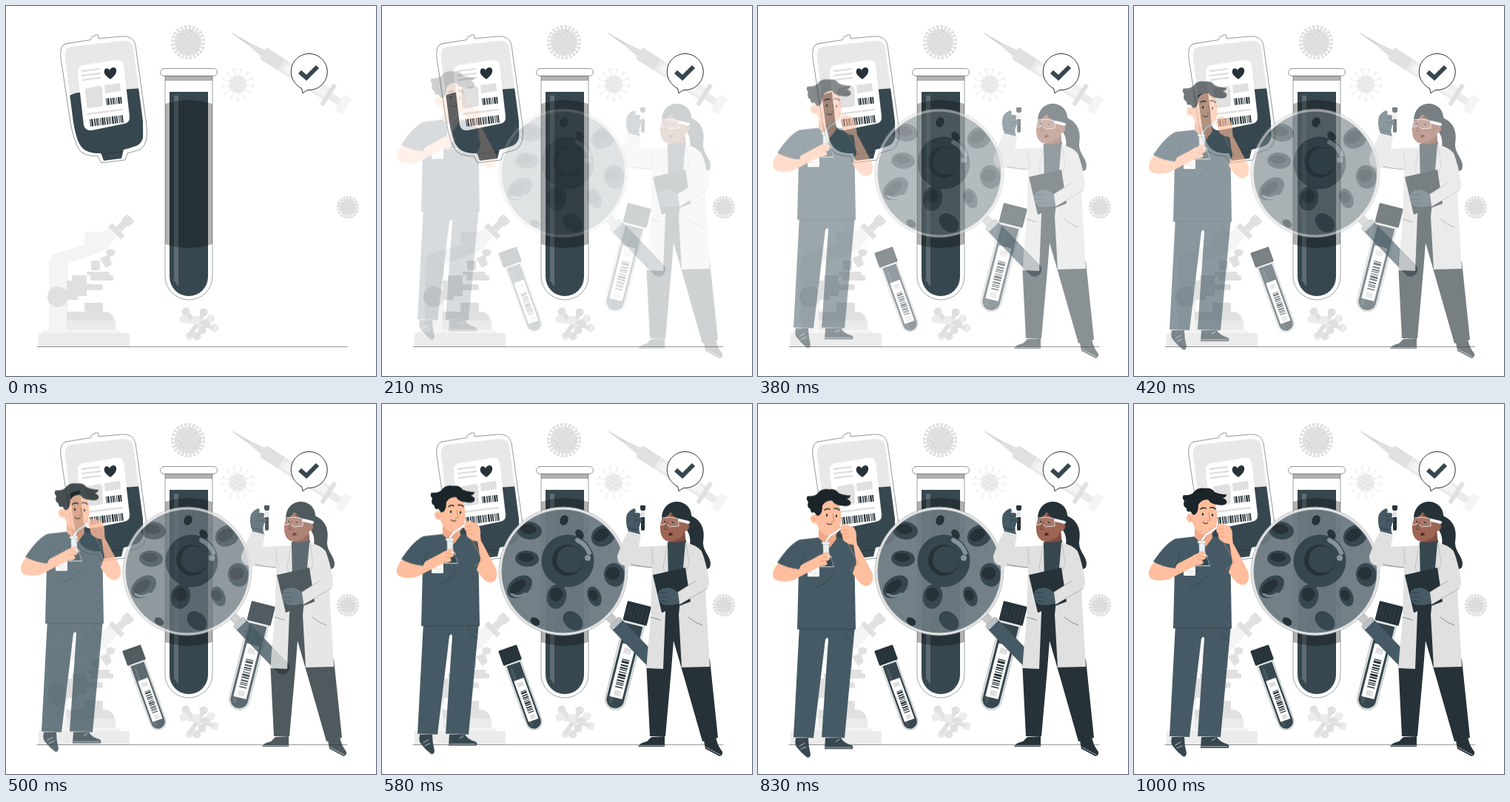
Recreate the animation shown at these times as an HTML page with a canvas. Size 500 px wide and 500 px high, loop 1040 ms.

```html
<!DOCTYPE html>
<html lang="en">
<head>
<meta charset="utf-8">
<title>Blood test</title>
<style>
html, body { margin: 0; width: 100%; height: 100%; overflow: hidden; background: #fff; }
canvas { display: block; width: 100vw; height: 100vh; }
</style>
</head>
<body>
<canvas id="stage"></canvas>
<script>
const SIZE = 500, LOOP = 1040;
const INK = '#263238', SLATE = '#37474f', STEEL = '#455a64';
const G1 = '#e0e0e0', G2 = '#ebebeb', G3 = '#f4f4f4';
const SKIN = '#ffbe9d', BROWN = '#9c6554', HAIR = '#1b2429';
const ratio = window.devicePixelRatio || 1;
let c;

function makeLayer(paint, canvas = document.createElement('canvas')) {
  canvas.width = canvas.height = SIZE * ratio;
  c = canvas.getContext('2d');
  c.scale(ratio, ratio);
  c.lineJoin = c.lineCap = 'round';
  paint();
  return canvas;
}

function shape(d, fill, stroke, width = 1) {
  const p = typeof d === 'string' ? new Path2D(d) : d;
  if (fill) { c.fillStyle = fill; c.fill(p); }
  if (stroke) { c.strokeStyle = stroke; c.lineWidth = width; c.stroke(p); }
}
const line = (d, color = INK, width = 1) => shape(d, null, color, width);

function oval(x, y, rx, ry, fill, turn = 0, stroke, width) {
  const p = new Path2D();
  p.ellipse(x, y, rx, ry, turn * Math.PI / 180, 0, 7);
  shape(p, fill, stroke, width);
}
const dot = (x, y, r, fill, stroke, width) => oval(x, y, r, r, fill, 0, stroke, width);

function box(x, y, w, h, fill, r = 0, stroke, width) {
  const p = new Path2D();
  p.roundRect(x, y, w, h, r);
  shape(p, fill, stroke, width);
}

function placed(x, y, deg, scale, paint) {
  c.save();
  c.translate(x, y);
  c.rotate(deg * Math.PI / 180);
  c.scale(scale, scale);
  paint();
  c.restore();
}

function clipped(d, paint) {
  c.save();
  c.clip(typeof d === 'string' ? new Path2D(d) : d);
  paint();
  c.restore();
}

function barcode(x, y, deg, length, height) {
  placed(x, y, deg, 1, () => {
    for (let i = 0, at = 0; at < length - 1; i++) {
      const w = 1 + (i * 7 % 5 % 3) * .7;
      box(at, 0, Math.min(w, length - at), height, INK);
      at += w + .8 + (i * 5 % 3) * .4;
    }
  });
}

function virus(x, y, r, spikes, reach, color, mark, thin) {
  for (let i = 0; i < spikes; i++) {
    placed(x, y, i * 360 / spikes + 6, 1, () => {
      line(`M${r - 1} 0H${reach - 1}`, color, thin ? 1 : 2.6);
      line(`M${reach - 1} ${thin ? -2 : -1.3}V${thin ? 2 : 1.3}`, color, thin ? 1.3 : 2);
    });
  }
  dot(x, y, r, color);
  for (let i = 0; i < spikes; i++) {
    const a = i * 2.4, d = r * .85 * Math.sqrt(i / spikes);
    dot(x + d * Math.cos(a), y + d * Math.sin(a), 1.1, mark);
  }
}

function syringe() {
  placed(306, 37, 32.7, 1, () => {
    shape('M0-.5L30-2V2L0 .5Z', '#d6d6d6');
    shape('M27-2L49-5V5L27 2Z', G1);
    box(49, -9, 32, 18, G1, 3);
    box(78, -9, 76, 18, G2, 2);
    box(83, -5, 68, 10, G3);
    for (let x = 62; x < 140; x += 7) line(`M${x}-9V-4`, '#d8d8d8', .7);
    box(153, -5, 24, 10, G2);
    box(151, -17, 6, 34, G1, 3);
    box(172, -12, 12, 24, G3, 2);
  });
}

function microscope() {
  shape('M58 440V348Q58 337 68 334L106 323V309Q106 305 111 305H132L146 316L136 328Q133 331 127 333L84 348V440Z', G3);
  shape('M131 307L143 295L155 307L142 320Z', G3);
  placed(152, 302, -44, 1, () => {
    box(-7, -12, 7, 24, G1, 1);
    box(0, -5, 13, 10, G1);
    box(12, -7, 11, 14, G1, 2);
  });
  box(115, 344, 12, 13, G1, 1);
  shape('M127 341L139 336L143 349L135 354Z', G1);
  shape('M135 331Q141 326 148 331L145 338Q140 339 136 336Z', G1);
  box(109, 359, 31, 5, G1, 2);
  box(114, 364, 31, 7, G1, 2);
  box(89, 364, 20, 28, G1);
  box(82, 371, 15, 26, G1);
  box(95, 376, 36, 8, G1, 3);
  dot(70, 393, 14, G1);
  box(106, 401, 25, 12, G1, 1);
  for (let x = 110; x < 130; x += 5) line(`M${x} 402V411`, '#d5d5d5', .6);
  shape('M82 413H135Q146 416 147 426H82Z', G1);
  box(82, 425, 66, 14, G2);
  box(48, 438, 107, 5, G3);
  box(44, 442, 123, 19, G2);
}

function bag() {
  shape('M81 51L112 46Q116 46 115 43Q115 41 119 41Q121 37 125 40V44L157 41Q172 40 175 53L190 162Q193 187 181 194L164 199L161 208L129 212L124 203Q104 203 98 193Q91 180 87 157L74 70Q72 53 81 51Z',
    '#fff', INK, .5);
  const inner = 'M88 55L158 47Q170 46 172 57L186 163Q188 184 176 189Q158 196 130 199Q108 200 101 189Q95 181 91 157L80 72Q78 57 88 55Z';
  shape(inner, '#e8e8e8');
  clipped(inner, () => shape('M80 126Q88 118 98 117L185 111V205H85Z', SLATE));
  shape('M128 198L159 194L156 206L132 209Z', SLATE);
  line('M130 200L157 197', INK, .8);
  shape('M104 80L149 73Q158 72 159 80L167 149Q168 157 160 159L116 168Q107 169 105 161L97 91Q96 82 104 80Z', '#fff');
  shape('M141 99C134 94 132 91 133 87C134 83 139 84 140 87C142 82 148 82 149 86C150 91 146 95 141 99Z', INK);
  line('M103 88L126 85M103 94L127 91M104 100L127 97', G1, 2.7);
  shape('M133 107L154 104L155 115L134 118Z', G1);
  shape('M110 111L126 108Q129 108 130 111L131 132Q131 135 128 136L112 138Q109 138 109 135L107 115Q107 111 110 111Z', G1);
  line('M110 146L157 140', G1, 2.7);
  barcode(135, 125, -6, 22, 9);
  barcode(113, 153, -7, 45, 10);
}

function bigTube() {
  const body = 'M215 95V365A32 32 0 0 0 279 365V95Z';
  shape(body, '#fff', INK, .45);
  shape('M221 116H273V366A26 26 0 0 1 221 366Z', SLATE);
  shape('M227 121H233V379L227 371Z', 'rgba(255,255,255,.2)');
  clipped(body, () => {
    dot(247, 227, 100, 'rgba(0,0,0,.3)');
    box(215, 95, 64, 6, 'rgba(0,0,0,.3)');
  });
  box(208.5, 84.5, 77, 10, '#fff', 5, INK, .5);
}

function backdrop() {
  box(0, 0, SIZE, SIZE, '#fff');
  virus(246, 49, 18, 24, 23, G1, '#d4d4d4');
  virus(313, 106, 12, 13, 22, '#ececec', '#dcdcdc', true);
  virus(462, 272, 11, 18, 15, G1, '#d5d5d5');
  syringe();
  microscope();
  [[243, 413], [240, 423], [249, 424], [267, 414], [277, 422], [258, 430], [265, 438], [282, 435], [248, 446], [258, 446]]
    .forEach(([x, y], i) => dot(x, y, 5.5, i % 3 ? G2 : G1));
  line('M243 413L258 430L267 415M258 430L248 445M258 425L278 434', G1, 6);
  dot(257, 425, 6, G2);
  dot(270, 429, 6, G1);
  line('M42 460.5H461', INK, .5);
  bag();
  bigTube();
  shape('M399 111A24.5 24.5 0 1 1 408 113.4Q404 115 401 118Q401 114 399 111Z', '#fff', INK);
  c.lineCap = 'butt'; c.lineJoin = 'miter';
  line('M397 89L406 97L421 82', SLATE, 6);
  c.lineCap = c.lineJoin = 'round';
}

function cell(x, y, rx, ry, turn) {
  oval(x, y, rx, ry, SLATE, turn);
  placed(x, y, turn, 1, () => oval(-rx * .1, -ry * .15, rx * .68, ry * .55, INK));
}

function magnifier() {
  placed(306, 286, 46, 1, () => {
    box(0, -6, 15, 12, '#c7c7c7');
    box(11, -9.5, 96, 19, STEEL, [2, 9, 9, 2]);
    box(11, -9.5, 7, 19, '#b9c0c3', 2);
  });
  dot(245, 226, 84, 'rgba(109,122,129,.95)');
  const glass = new Path2D();
  glass.arc(245, 226, 83, 0, 7);
  clipped(glass, () => {
    cell(199, 171, 17, 12, 8);
    oval(246, 157, 5.5, 7, INK, 25);
    cell(299, 178, 17, 14, -30);
    cell(196, 209, 16, 11, 4);
    cell(186, 247, 19, 13, -38);
    cell(236, 260, 13, 17, 12);
    cell(287, 260, 9, 14, -22);
    cell(314, 231, 14, 16, -15);
    oval(258, 293, 15, 11, SLATE, 42);
    oval(207, 294, 7, 5, INK, 35);
    line('M175 257Q184 263 194 256', '#75878f', 3);
    dot(251, 212, 35.5, SLATE);
    dot(251, 211, 21, INK);
    dot(254, 210, 18, SLATE);
    line('M237 202A18 18 0 0 0 257 229', INK, 3);
    oval(267, 176, 5, 7, INK, -35);
    line('M264 184Q276 190 280 201', '#84939a', 6);
    dot(278, 208, 4, '#84939a');
  });
  dot(245, 226, 85, null, '#e2e2e2', 3.4);
  dot(245, 226, 87, null, '#8d979b', .5);
  dot(245, 226, 83, null, '#89959a', .5);
}

function vial(x, y, deg, scale) {
  placed(x, y, deg, scale, () => {
    shape('M-11 20H11V105A11 11 0 0 1-11 105Z', '#e4e7e8', '#9da5a8', .5);
    shape('M-9.4 23H9.4V105A9.4 9.4 0 0 1-9.4 105Z', SLATE);
    box(-6, 27, 3, 83, 'rgba(255,255,255,.1)');
    box(-7, 45, 14, 58, '#fff');
    box(-4, 49, 8, 6, G1);
    box(-3, 95, 7, 6, G1);
    barcode(4.5, 61, 90, 31, 8);
    box(-13, 0, 26, 21, INK, 1);
    for (let i = -10; i < 12; i += 4) line(`M${i} 4V18`, SLATE, .6);
  });
}

function woman() {
  // legs and shoes
  shape('M379 270H404L407 345H443L454 451L433 456L405 358L394 320L391 358L383 449H362L357 348Z', INK);
  shape('M364 450L382 449V463H346Q348 458 358 456Z', INK);
  shape('M435 455L451 450Q453 461 460 470Q461 475 456 476Q443 469 437 466Z', INK);
  line('M347 461.5H381M438 464L457 474', '#fff', .6);
  // ponytail and neck
  shape('M408 148C432 153 437 169 434 186C433 201 448 208 443 221C436 227 422 222 417 208C412 195 422 184 411 169Z', INK);
  shape('M389 174L409 168L411 191L387 191Z', '#7d4d40');
  // top and coat
  shape('M386 186Q398 189 411 184L412 245L405 274H380Z', SLATE);
  shape('M386 191L347 193L350 176L333 170Q324 188 318 205Q317 217 330 219L365 221L363 290L357 357L380 358L383 282L387 246Z', G1);
  shape('M410 187Q426 191 432 199Q438 214 442 238Q443 248 437 252L443 355L405 356L401 285L405 245Z', G1);
  line('M385 193L380 220L387 246M411 188L415 216L405 241M365 195L366 217', '#b1b1b1', .7);
  line('M414 288Q423 296 433 299M363 288L376 292M365 221Q350 220 337 217', INK, .5);
  // clipboard and lower hand
  shape('M366 231L410 221L417 267L378 282Z', INK);
  shape('M438 231Q445 244 438 250L402 271L397 256L424 239Z', G1);
  line('M424 239L397 256L402 271L438 250', '#9a9a9a', .7);
  shape('M400 255Q391 246 381 249Q374 250 373 257Q372 268 381 271Q393 273 402 269Z', STEEL);
  line('M374 256L386 255M374 261L387 261M376 266L387 267', INK, .7);
  // raised hand with sample
  box(350, 141, 5, 30, INK, 2);
  box(349, 137, 7, 6, INK, 1);
  box(350, 144, 5, 9, '#e6e6e6');
  shape('M333 172Q328 159 331 149Q335 143 341 141Q344 143 342 147L347 147Q351 149 348 152L351 155Q353 158 349 161L347 169L349 176Z', STEEL);
  line('M341 151L348 151M340 157L349 157M331 166Q340 171 348 169', INK, .7);
  // head
  shape('M379 154Q375 163 376 169Q376 180 384 185Q397 187 407 177L416 162L412 146L385 145Z', BROWN);
  shape('M378 156C378 139 388 132 399 132C414 133 420 145 418 158L414 171Q409 166 408 158Q396 155 390 146Q386 152 378 156Z', INK);
  oval(411, 166, 4, 5, BROWN, 10);
  shape('M376 154L389 153L401 155V165L389 166L384 162L376 164Z', 'rgba(255,255,255,.12)', '#eee', .8);
  line('M402 157L414 160', '#f0f0f0', 4);
  line('M381 150L386 149M391 150L398 152', INK, 1.3);
  dot(382, 159, 1.1, INK);
  dot(393, 160, 1.1, INK);
  line('M385 160L382 169L386 170', '#5b352b', .8);
  oval(390, 176, 3, 2, '#4f2b28', -8);
  dot(412, 174, 1.2, '#fff');
}

function man() {
  // trousers and shoes
  shape('M56 298H131L117 450L86 449L95 317Q94 312 91 317L75 450L48 449Z', STEEL);
  line('M117 306Q121 318 129 320', INK, .5);
  shape('M51 450H68Q68 461 71 472Q70 478 66 476Q58 470 53 463Q49 460 51 450Z', SLATE);
  shape('M91 450H112Q116 457 127 460Q130 463 127 465H90Z', SLATE);
  line('M56 461L63 457M58 465L65 462M105 455L110 452M91 463H126', '#fff', .7);
  // torso
  shape('M56 182L83 179H106Q124 181 130 191L132 303H53L55 224L27 218Z', STEEL);
  line('M53 303H132', INK, .5);
  shape('M82 168L105 172L106 181L97 193L82 180Z', '#f2a886');
  line('M102 229Q91 242 76 248M119 202Q128 215 132 231', INK, .5);
  // far arm
  shape('M116 181Q129 181 135 190L154 226Q158 240 149 244Q142 247 133 235L124 222L133 212L120 187Z', SKIN);
  shape('M119 182L129 188L133 214L127 229L114 216Z', STEEL);
  line('M121 187L136 214L125 223', '#df8e72', .6);
  // badge
  box(67, 219, 16, 13, '#fff', 1);
  dot(71, 226, 1.8, G1);
  line('M74 226H80M74 229H79', '#c4c4c4', .8);
  // near arm
  shape('M27 214L55 218L78 206Q88 199 96 203Q102 204 98 210L91 217L80 220L47 237Q30 241 22 235Q16 227 27 214Z', SKIN);
  shape('M57 182Q44 186 26 213Q38 220 55 222L66 203Z', STEEL);
  line('M55 222L62 204', INK, .5);
  // head
  oval(76, 154, 5, 6, SKIN, -10);
  shape('M79 139L86 128L108 130Q114 146 112 160Q111 174 101 177Q89 178 82 167L78 158Z', SKIN);
  shape('M80 150L76 145Q71 147 71 141Q65 138 68 131Q64 127 67 123Q75 124 80 120Q86 112 96 114Q105 113 109 119Q117 123 125 122Q125 126 120 127Q127 130 125 134Q122 138 113 136Q104 136 100 129Q91 129 87 136Q87 146 83 149Z', HAIR);
  line('M90 142Q93 139 97 141M103 140Q108 139 110 142', HAIR, 1.4);
  oval(93, 149, 1.2, 1.8, HAIR);
  oval(106, 150, 1.2, 1.8, HAIR);
  line('M101 147L103 157L99 158', '#d78168', .9);
  line('M93 160Q96 163 100 161', HAIR, 1);
  line('M74 152Q77 153 77 157', '#df8e72', .7);
  // flask, pipette and fingers
  shape('M88 187H96L96 200L103 219H83L88 200Z', '#e9eef0', '#7f8d94', .6);
  shape('M87 206H98L102 218H84Z', SLATE);
  box(86, 185, 11, 3, '#fff', 1, '#9aa5aa', .6);
  line('M92 184L97 177L119 162', '#8d989d', 3.2);
  line('M92 184L97 177L119 162', '#fff', 2.4);
  shape('M76 210L86 203Q89 197 96 200Q98 202 92 205L97 206Q99 209 92 211L94 215Q90 219 82 217Z', SKIN);
  line('M88 205L96 206M86 210L93 211', '#df8e72', .7);
  shape('M112 166Q113 160 119 162L129 165Q134 171 133 181L134 190L123 188Q112 183 114 176Q110 172 112 166Z', SKIN);
  line('M114 169H121M114 174L122 174M115 179L122 179', '#df8e72', .7);
}

const back = makeLayer(backdrop);
const vials = makeLayer(() => {
  vial(169.5, 329.5, -19.8, 1.01);
  vial(348, 270, 14.2, 1.27);
});
const lens = makeLayer(magnifier);
const womanLayer = makeLayer(woman);
const manLayer = makeLayer(man);

// man's vertical offset by animation step
const drop = [[1, -36], [5, -25.5], [9, -14.5], [12, -6.5], [16, -.3], [20, 1.3], [24, 0]];
function offset(n) {
  const i = Math.max(1, drop.findIndex(([at]) => at >= n));
  const [a, from] = drop[i - 1], [b, to] = drop[i];
  return from + (to - from) * (n - a) / (b - a);
}

const startOf = n => Math.round(n * 100 / 24) * 10;
function stepAt(t) {
  let n = 24;
  while (n > 0 && startOf(n) > t + .01) n--;
  return n;
}

const canvas = document.getElementById('stage');
makeLayer(() => {}, canvas);
const view = canvas.getContext('2d');
const put = (layer, y = 0) => view.drawImage(layer, 0, y, SIZE, SIZE);

function render(t) {
  const n = stepAt(t);
  view.globalAlpha = 1;
  put(back);
  if (n < 2) return;
  view.globalAlpha = Math.min(1, (n - 1) / 13) ** 1.3;
  put(vials);
  put(lens);
  put(womanLayer);
  put(manLayer, offset(n));
}

const begin = performance.now();
function tick() {
  render((performance.now() - begin) % LOOP);
  requestAnimationFrame(tick);
}
tick();
</script>
</body>
</html>
```
